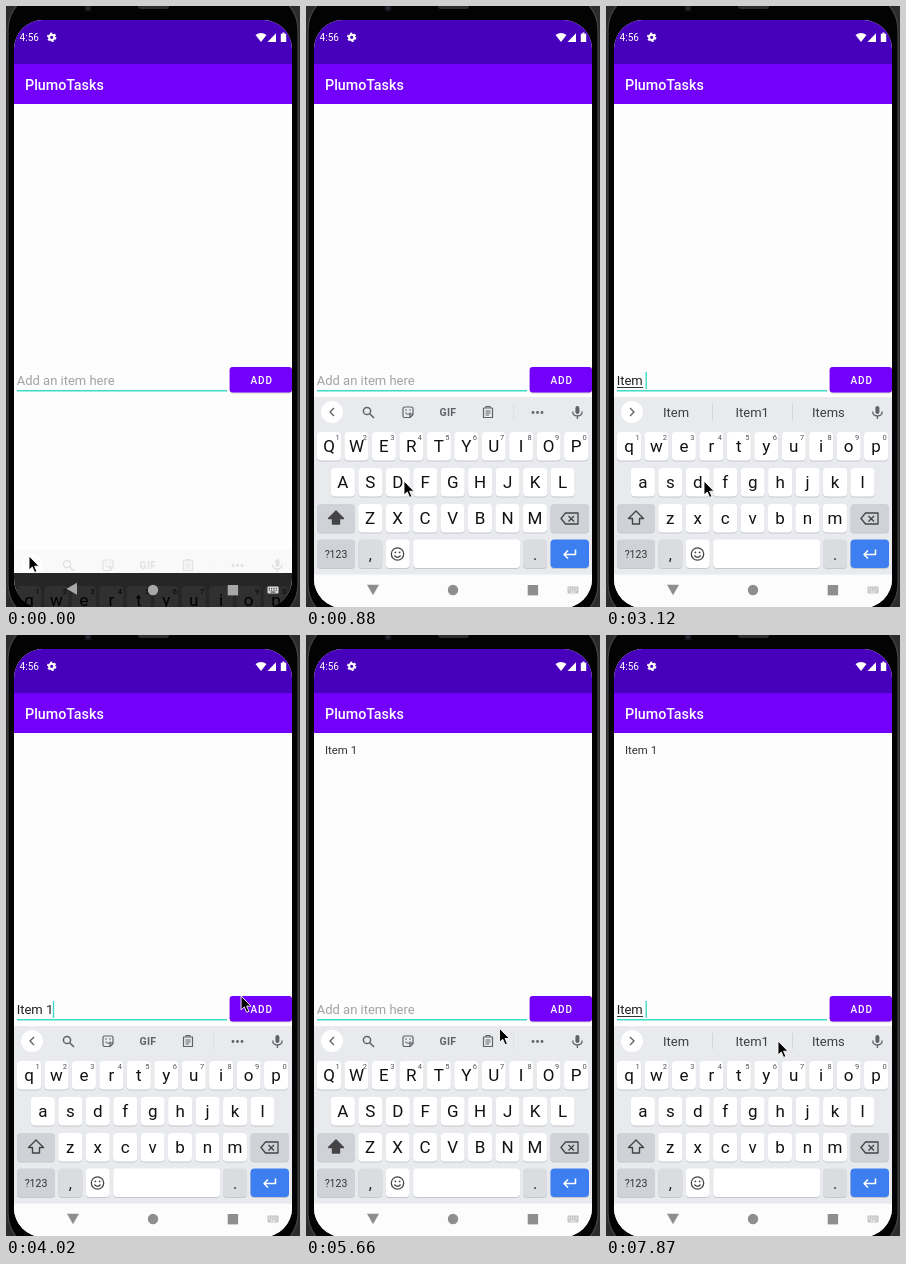
An HTML page for the animation above (8 s loop, 294x601 px).

```html
<!DOCTYPE html>
<html lang="en">
<head>
<meta charset="utf-8">
<title>Todo list demo</title>
<style>
html, body { margin: 0; width: 100%; height: 100%; overflow: hidden; background: #000; }
svg { display: block; width: 294px; height: 601px; font-family: Roboto, "Liberation Sans", sans-serif; }
</style>
</head>
<body>
<svg id="stage" viewBox="0 0 294 601"></svg>
<script>
const LOOP = 8000, STEP = 148.6, LEAD = 12;
const PURPLE = '#7300fa', TEAL = '#3ddbc8', ICON = '#5f6368', KEY_GREY = '#cfd2d7', KEY_SOFT = '#dadce0';
const stage = document.getElementById('stage');
const ruler = document.createElement('canvas').getContext('2d');
ruler.font = '13px Roboto, "Liberation Sans", sans-serif';

// Drawing helpers
const rect = (x, y, w, h, fill, r = 0, more = '') =>
  `<rect x="${x}" y="${y}" width="${w}" height="${h}" rx="${r}" fill="${fill}" ${more}/>`;
const dot = (x, y, r, fill, more = '') => `<circle cx="${x}" cy="${y}" r="${r}" fill="${fill}" ${more}/>`;
const line = (d, color = ICON, w = 1.4, fill = 'none') =>
  `<path d="${d}" fill="${fill}" stroke="${color}" stroke-width="${w}" stroke-linejoin="round"/>`;
const shape = (d, fill) => `<path d="${d}" fill="${fill}"/>`;
const text = (s, x, y, size, fill, more = '') =>
  `<text x="${x}" y="${y}" font-size="${size}" fill="${fill}" ${more}>${s}</text>`;
const label = (s, x, y, size, fill, more = '') => text(s, x, y, size, fill, 'text-anchor="middle" ' + more);
const group = (body, x, y, more = '') => `<g transform="translate(${x} ${y})" ${more}>${body}</g>`;

const lerp = (a, b, u) => a + (b - a) * u;
const clamp = u => Math.max(0, Math.min(1, u));
const smooth = u => u * u * (3 - 2 * u);
const latest = (list, n) => list.reduce((v, [at, s]) => n >= at ? s : v, list[0][1]);

const typing = [[0, ''], [16, 'I'], [17, 'It'], [18, 'Ite'], [20, 'Item'], [21, 'Item '], [24, 'Item 1'],
  [34, ''], [45, 'I'], [46, 'It'], [48, 'Ite'], [50, 'Item'], [52, 'Item ']];
const route = [[0, 23, 550], [2, 23, 545], [6, 98, 475], [25, 98, 475], [28, 283, 321],
  [31, 233, 370], [35, 233, 370], [40, 172, 406]];

function pointerAt(n) {
  let i = route.findIndex(p => p[0] > n);
  if (i < 0) return route[route.length - 1].slice(1);
  const [t0, x0, y0] = route[i - 1], [t1, x1, y1] = route[i];
  const u = smooth((n - t0) / (t1 - t0));
  return [lerp(x0, x1, u), lerp(y0, y1, u)];
}

function phone() {
  return rect(0, 0, 294, 601, '#2c2c2c') +
    rect(2, -14, 290, 630, '#030303', 38, 'stroke="#444" stroke-width="1.2"') +
    rect(132, -4, 31, 7, '#2b2b2b', 3) + dot(82, 2, 3.5, '#15161c') + dot(82, 2, 1.5, '#2c2f3d');
}

function header() {
  const gear = dot(0, 0, 2.6, 'none', 'stroke="#fff" stroke-width="2"') +
    dot(0, 0, 4, 'none', 'stroke="#fff" stroke-width="1.4" stroke-dasharray="2.1 2.09"');
  return rect(8, 14, 278, 44, '#4700bc') + rect(8, 58, 278, 40, PURPLE) +
    text('4:56', 13.6, 35.3, 10, '#fff') + group(gear, 45.7, 31.3) +
    shape('M249.5 29Q255 24.8 260.5 29L255 36Z', '#fff') +
    shape('M261.5 36H270V27.3Z', '#fff') +
    shape('M276.5 26.5h2v1.2h1.7v8.3h-5.4v-8.3h1.7z', '#fff') +
    text('PlumoTasks', 19, 83.5, 14.3, '#fff', 'font-weight="500"');
}

function addButton(n) {
  const ripple = n >= 33 && n < 36
    ? dot(236, 374, 34 + (n - 33) * 16, '#fff', `opacity="${0.22 - (n - 33) * 0.07}" clip-path="url(#button)"`) : '';
  return rect(224, 362, 62, 25.5, '#000', 3, 'opacity=".15"') + rect(223.6, 361, 62.4, 25.5, PURPLE, 3) + ripple +
    label('ADD', 255.7, 377.5, 10, '#fff', 'font-weight="500" letter-spacing=".9"');
}

function inputField(n, value) {
  const composing = value.length > 1 && (n < 23 || n >= 45);
  const caretOn = value || (n >= 10 && n < 13) || (n >= 34 && n < 37);
  const width = s => ruler.measureText(s).width;
  let out = rect(11, 384, 210, 1.5, TEAL);
  out += value ? text(value, 10.7, 379, 13, '#222') : text('Add an item here', 10.7, 379, 13, '#a3a3a3');
  if (composing) out += rect(11, 381, width(value.trim()), 1, '#333');
  if (caretOn) out += rect(10.7 + width(value) - 0.5, 366, 1.4, 17, TEAL);
  return out;
}

function key(x, y, w, fill, h = 28.5) {
  return rect(x, y + 1, w, h, '#c4c7cc', 4) + rect(x, y, w, h, fill, 4);
}

function keyRow(letters, x, y, caps, fill = '#fff', ink = '#111') {
  return [...letters].map((c, i) => {
    const cx = x + i * 27.45;
    const face = fill === '#fff' ? key(cx - 12, y, 24, fill) : rect(cx - 12, y, 24, 28.5, fill, 4);
    const digit = letters.length === 10 ? label((i + 1) % 10, cx + 8.5, y + 8.3, 7.5, ink === '#111' ? '#555' : ink) : '';
    return face + label(caps ? c.toUpperCase() : c, cx, y + 20, 17, ink) + digit;
  }).join('');
}

function toolbar(suggestions, turned) {
  let out = dot(26, 406, 11, '#fff') + line(turned ? 'M24 402l4 4-4 4' : 'M28 402l-4 4 4 4');
  if (suggestions) {
    suggestions.forEach((s, i) => out += label(s, 70 + i * 76.2, 411, 13, '#3c4043'));
    out += rect(106, 398, 1, 16, '#d2d5d9') + rect(186, 398, 1, 16, '#d2d5d9');
  } else {
    out += dot(61, 405, 3.6, 'none', `stroke="${ICON}" stroke-width="1.5"`) + line('M63.7 407.7l4.3 4.3', ICON, 1.6) +
      line('M98.5 401h7q1.5 0 1.5 1.5v6l-3 3h-5.5q-1.5 0-1.5-1.5v-7.5q0-1.5 1.5-1.5zM99.5 406.5q2.5 3.5 5 0M107 408h-3v3', ICON, 1.2) +
      dot(100, 404, 0.8, ICON) + dot(104, 404, 0.8, ICON) +
      label('GIF', 142, 410, 10.5, ICON, 'font-weight="700" letter-spacing=".3"') +
      line('M177.5 402h9v9.5h-9zM180 402v-1.5h4v1.5M179.5 405h5M179.5 407h5M179.5 409h3.5', ICON, 1.2) +
      rect(207, 398, 1, 16, '#dcdfe3') + [227, 231.5, 236].map(x => dot(x, 406.5, 1.4, ICON)).join('');
  }
  return out + rect(269.4, 400, 4, 8, ICON, 2) + line('M266.7 405.5q0 4.5 4.7 4.5t4.7-4.5M271.4 410v3', ICON, 1.3);
}

function keyboard(n, value) {
  const caps = n > 2 && value.length < 2;
  const suggesting = value.length > 1 && (n < 24 || n >= 45);
  const settled = (n >= 21 && n < 24) || n >= 53;
  const words = settled ? ['Item', 'Item1', 'Items'] : ['It', 'Ite', 'Item'];
  const face = dot(91.5, 548, 6.2, 'none', 'stroke="#444" stroke-width="1.3"') +
    dot(89.4, 546.4, 0.9, '#444') + dot(93.6, 546.4, 0.9, '#444') + line('M88.4 549.5q3.1 3.6 6.2 0', '#444', 1.2);
  const body = rect(8, 391, 278, 178, '#e8eaed') +
    toolbar(suggesting ? words : null, suggesting || n === 24 || n === 25) +
    keyRow('qwertyuiop', 23, 426, caps) + keyRow('asdfghjkl', 36.9, 462, caps) + keyRow('zxcvbnm', 64.2, 498, caps) +
    key(11, 498, 38, KEY_GREY) + line('M30 505l7.5 7.5h-4v5.5h-7v-5.5h-4z', '#444', 1.4, caps ? '#444' : 'none') +
    key(244.5, 498, 38.5, KEY_GREY) + line('M259.5 507h12.5v11h-12.5l-4.5-5.5zM262.5 510l5.5 5.5M268 510l-5.5 5.5', '#444', 1.3) +
    key(11, 533.5, 38, KEY_GREY) + label('?123', 30, 552, 10.5, '#333') +
    key(52.3, 533.5, 24, KEY_SOFT) + label(',', 64.3, 554, 16, '#222') +
    key(79.7, 533.5, 24, '#fff') + face + key(107.2, 533.5, 107, '#fff') +
    key(217, 533.5, 24, KEY_SOFT) + label('.', 229, 554, 16, '#222') +
    key(244.5, 533.5, 38.5, '#3d7ff0') + line('M269.5 543.5v5h-11M262 544.5l-4 4 4 4', '#fff', 1.5);
  const drop = [153, 28, 1][n] || 0, alpha = [0.18, 0.8][n] || 1;
  return group(body, 0, drop, `opacity="${alpha}"`);
}

function navBar(n) {
  const dark = n === 0, ink = dark ? '#a8a8a8' : '#8e8e8e', small = dark ? '#ddd' : '#c4c4c4';
  let out = dark ? rect(8, 567, 278, 34, '#262626') + keyRow('qwertyuiop', 23, 580, false, '#303030', '#000')
    : rect(8, 568.5, 278, 32.5, n === 1 ? '#b5b5b5' : '#fcfcfc');
  out += group(`<path d="M-6-4H6L0 6.5Z" fill="${ink}" transform="rotate(${Math.min(n + 1, 4) * 90})"/>`, 67, 582.7);
  out += dot(147, 584, 5.2, ink) + rect(221.7, 579, 10.4, 10.4, ink) + rect(261.5, 580.5, 11, 7, small, 1);
  const face = dark ? '#262626' : '#fcfcfc';
  for (let i = 0; i < 8; i++) out += rect(262.8 + i % 4 * 2.3, 581.8 + (i > 3) * 1.9, 1.1, 1, face);
  return out + rect(264.5, 585.6, 5, 0.9, face);
}

function toast(n) {
  const alpha = Math.min(clamp((n - 38) / 5), clamp((52 - n) / 3));
  return alpha ? `<g opacity="${alpha}">` + rect(94, 516, 106, 35, '#000', 17.5, 'opacity=".07"') +
    rect(94.8, 515.8, 104.6, 34, '#ebebeb', 17) + label('Item was added', 146.8, 536.8, 10.1, '#333') + '</g>' : '';
}

function pointer(n) {
  const arrow = line('M0 0V14L3.3 11 5.6 16.4 7.9 15.4 5.6 10.2H10Z', '#fff', 0.9, '#000');
  return group(arrow, ...pointerAt(n));
}

function render(n) {
  const value = latest(typing, n);
  const screen = rect(8, 14, 278, 588, '#fdfdfd') + header() +
    (n >= 34 ? text('Item 1', 19, 119, 11.4, '#333') : '') +
    inputField(n, value) + addButton(n) + keyboard(n, value) + navBar(n) + toast(n);
  stage.innerHTML = '<defs><clipPath id="screen">' + rect(8, 14, 278, 588, '#000', 29) + '</clipPath>' +
    '<clipPath id="button">' + rect(223.6, 361, 62.4, 25.5, '#000', 3) + '</clipPath></defs>' +
    phone() + `<g clip-path="url(#screen)">${screen}</g>` + pointer(n);
}

const start = performance.now();
let shown = -1;
function tick(now) {
  const n = Math.floor((Math.max(0, now - start) % LOOP + LEAD) / STEP);
  if (n !== shown) render(shown = n);
  requestAnimationFrame(tick);
}
tick(start);
</script>
</body>
</html>
```
